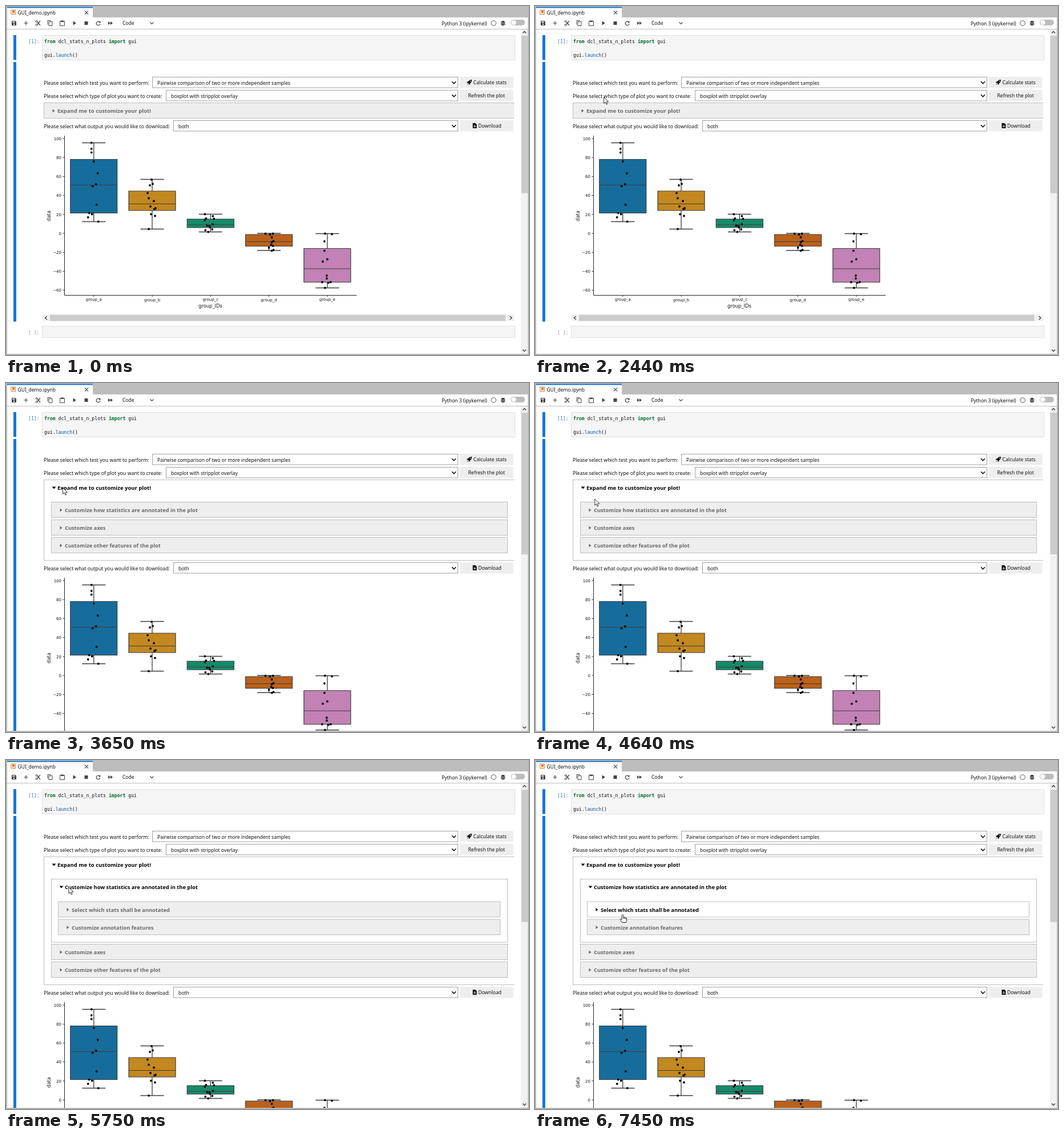
These frames come from a looping animation (916 by 611 pixels, 8 s). An HTML page with a canvas:

```html
<!DOCTYPE html>
<html lang="en">
<head>
<meta charset="utf-8">
<title>Notebook plot GUI</title>
<style>
  html, body { margin: 0; width: 100%; height: 100%; overflow: hidden; background: #fff; }
  canvas { display: block; }
</style>
</head>
<body>
<canvas id="stage" width="916" height="611"></canvas>
<script>
const ctx = document.getElementById('stage').getContext('2d');
const LOOP = 8000;
const UI = '"Noto Sans", sans-serif', MONO = '"DejaVu Sans Mono", monospace', PLOT = '"DejaVu Sans", sans-serif';
const BLUE = '#1976d2', LINE = '#3d3d3d';

// Pointer moves: start, end, number of steps, target x, target y
const MOVES = [
  [820, 1210, 5, 25, 4], [1510, 1510, 1, 45, 11], [1610, 1810, 3, 181, 91.5],
  [2120, 2650, 6, 99.5, 183.5], [4350, 4840, 6, 110, 223],
  [6340, 6770, 5, 125.5, 266], [7160, 7450, 4, 153.5, 270]
];

// Five box levels (top whisker to bottom whisker) and points as x offset, y
const GROUPS = [
  { name: 'a', fill: '#166d9c', box: [239.5, 268.5, 313.5, 362.5, 377.5],
    dots: [-4, 239.5, -4, 250, -4, 256.5, 0, 272, 7, 293, 4, 312, -2, 315.5, 5, 348, -8, 362.5, -3, 364.5, -10, 370, 8, 377.5] },
  { name: 'b', fill: '#c38820', box: [303.5, 324, 346.5, 358, 390.5],
    dots: [-1, 304, 1, 311.5, -4, 314, -8, 327.5, -6, 336.5, 3, 341.5, -3, 351, 6, 354, 4, 355.5, -2, 364.5, 5, 367.5, -6, 390.5] },
  { name: 'c', fill: '#158b6a', box: [364.5, 373, 383, 388, 395.5],
    dots: [-10, 364.5, 4, 368, -8, 372, 6, 372.5, -10, 375, 4, 382, -6, 384.5, -2, 385, -1, 387.5, 3, 391, -9, 392.5, -4, 395.5] },
  { name: 'd', fill: '#ba611b', box: [398, 400, 412.5, 420.5, 428],
    dots: [-6, 398.5, 7, 398.5, 2, 400, 5, 405, 8, 411.5, 5, 413.5, 4, 418, 7, 420, 0, 423, 8, 427, 5, 428.5] },
  { name: 'e', fill: '#c282b5', box: [398.5, 424.5, 460, 483.5, 493.5],
    dots: [-4, 398.5, 8, 399.5, -5, 412, -5, 428.5, 0, 443.5, -8, 447.5, -1, 472, -1, 477, -9, 483.5, 6, 483.5, 2, 484.5, -4, 493.5] }
];

let pointer, cursor, busy;

function rect(x, y, w, h, fill, stroke) {
  if (fill) { ctx.fillStyle = fill; ctx.fillRect(x, y, w, h); }
  if (stroke) { ctx.strokeStyle = stroke; ctx.lineWidth = 1; ctx.strokeRect(x, y, w, h); }
}

function text(str, x, y, size = 8.6, color = '#111', family = UI, weight = 400, align = 'left') {
  ctx.font = `${weight} ${size}px ${family}`;
  ctx.fillStyle = color;
  ctx.textAlign = align;
  ctx.fillText(str, x, y);
}

function shape(d, x, y, fill, stroke, width = 1) {
  const path = new Path2D(d);
  ctx.save();
  ctx.translate(x, y);
  if (fill) { ctx.fillStyle = fill; ctx.fill(path); }
  if (stroke) { ctx.strokeStyle = stroke; ctx.lineWidth = width; ctx.stroke(path); }
  ctx.restore();
}

function dot(x, y, r, fill, stroke) {
  ctx.beginPath();
  ctx.arc(x, y, r, 0, 7);
  if (fill) { ctx.fillStyle = fill; ctx.fill(); }
  if (stroke) { ctx.strokeStyle = stroke; ctx.lineWidth = 1; ctx.stroke(); }
}

const inside = (x, y, w, h) => pointer && pointer.x >= x && pointer.x <= x + w && pointer.y >= y && pointer.y <= y + h;

function pointerAt(t) {
  if (t < MOVES[0][0]) return null;
  let x = 3, y = -8;
  for (const [from, to, steps, tx, ty] of MOVES) {
    if (t < from) break;
    const k = Math.min(steps, 1 + Math.floor((t - from) / (to - from || 1) * (steps - 1) + 1e-6));
    const u = k / steps, e = u * u * (3 - 2 * u);
    x += (tx - x) * e;
    y += (ty - y) * e;
  }
  return { x, y };
}

// Accordion section; h is the full height, 27 when closed
function section(label, x, y, w, h = 27, size = 9.25) {
  const open = h > 27, hover = !open && inside(x, y, w, 27);
  if (hover && !busy) cursor = 'hand';
  const ink = open || hover ? '#000' : '#696969';
  rect(x, y, w, h, open || hover ? '#fff' : '#eee', '#bdbdbd');
  shape(open ? 'M-1 -2H6L2.5 2Z' : 'M0 -3L4 0L0 3Z', x + 15, y + 14, ink);
  text(label, x + 23.5, y + 17.6, size, ink, UI, 700);
}

function select(label, x, y, value) {
  text(label, 66, y + 13.2, 8.7);
  rect(x, y, 791.5 - x, 18.5, '#fff', '#a0a0a0');
  text(value, x + 8.5, y + 13.2, 8.5);
  shape('M-3.5 -1.8L0 1.8L3.5 -1.8', 784.5, y + 9.5, null, '#111', 1.6);
}

function button(label, x, y) {
  rect(795, y, 93.5, 19.5, '#eee');
  text(label, x, y + 13);
}

function tabAndToolbar() {
  rect(0, 0, 916, 20, '#bdbdbd');
  rect(2, 2, 150, 18, '#fff');
  rect(2, 1.5, 150, 2, BLUE);
  rect(9, 7, 7.5, 7.5, '#fff', '#e0762b');
  shape('M0 0H4V5L2 3.5L0 5Z', 11, 8, '#e0762b');
  text('GUI_demo.ipynb', 20.5, 14.8, 8.5);
  shape('M-3 -3L3 3M3 -3L-3 3', 141, 11.5, null, '#555', 1.1);

  rect(2, 20, 912, 20, '#fff');
  rect(2, 40, 912, 1, '#bdbdbd');
  const ink = '#444';
  shape('M-4 -4H2.5L4 -2.5V4H-4Z', 14, 30, ink);
  rect(11.5, 27, 4, 2, '#fff');
  dot(14, 31.8, 1.2, '#fff');
  shape('M-3.5 0H3.5M0 -3.5V3.5', 35, 30, null, ink, 1.2);
  shape('M-3 -4L3.5 4M3.5 -4L-3 4', 56.5, 30, null, ink, 1.2);
  dot(53.5, 27, 1.5, '#fff', ink);
  dot(53.5, 33, 1.5, '#fff', ink);
  shape('M-4 2.5V-4.5H2M-2 -2.5H4V4.5H-2Z', 77, 30, null, ink);
  shape('M-4 -3.5H4V4.5H-4Z', 98.5, 30, null, ink);
  rect(96, 25.5, 5, 2.5, ink);
  shape('M-2.5 -3.5L3 0L-2.5 3.5Z', 120, 30, ink);
  rect(137.5, 27, 6, 6, ink);
  shape('M2.7 -2A3.4 3.4 0 1 0 3.4 1', 161.5, 30.3, null, ink, 1.2);
  shape('M4 -4V-.5H.5Z', 161.5, 30, ink);
  shape('M-4 -3L0 0L-4 3ZM0 -3L4 0L0 3Z', 183, 30, ink);
  text('Code', 204, 33.3, 8.5);
  shape('M-3 -1.5L0 1.5L3 -1.5', 255.5, 30, null, ink, 1.2);
  text('Python 3 (ipykernel)', 763, 33.5, 8.55);
  dot(854, 30, 4.3, null, '#555');
  shape('M-4 -2H4M-4 .3H4M-4 2.6H4M-2 -4L2 4M2 -4L-2 4', 870.5, 30, null, ink, .9);
  shape('M-1.5 -4H1.5L2.6 -2V2.5L1 4.2H-1L-2.6 2.5V-2Z', 870.5, 30, ink);
  rect(869.5, 29, 2, .8, '#fff');
  rect(869.5, 31, 2, .8, '#fff');
  shape('M5 0H20A5 5 0 0 1 20 10H5A5 5 0 0 1 5 0Z', 884, 24, '#bdbdbd');
  dot(889.3, 29, 4.2, '#fff');
}

function codeCell() {
  rect(13, 51, 5, 43.5, BLUE);
  rect(63.5, 51.5, 828, 43, '#f5f5f5', '#e0e0e0');
  const mono = (str, col, y, color = '#111', weight = 400) => text(str, 67 + col * 4.91, y, 8.155, color, MONO, weight);
  text('[1]:', 39, 64.5, 8.155, '#307fc1', MONO);
  mono('from', 0, 64.5, '#006b2d', 700);
  mono('dcl_stats_n_plots', 5, 64.5);
  mono('import', 23, 64.5, '#006b2d', 700);
  mono('gui', 30, 64.5);
  mono('gui.', 0, 88.5);
  mono('launch', 4, 88.5, '#0055aa');
  mono('()', 10, 88.5);
  if (inside(63, 51, 828, 43)) cursor = 'beam';
}

function plot() {
  shape('M102.5 227V506.5H614', 0, 0, null, '#222', 1);
  for (let v = 100; v >= -60; v -= 20) {
    const y = 398 - v * 1.66;
    rect(99.5, y - .4, 3, .9, '#222');
    text(String(v).replace('-', '−'), 97, y + 2.7, 7, '#111', PLOT, 400, 'right');
  }
  GROUPS.forEach(({ name, fill, box, dots }, i) => {
    const x = 153.75 + i * 102.25, [top, q3, mid, q1, low] = box;
    rect(x - .4, 506.5, .9, 3, '#222');
    text('group_' + name, x, 516 + i % 2, 7, '#111', PLOT, 400, 'center');
    shape(`M-20.5 ${top}H20.5M0 ${top}V${q3}M0 ${q1}V${low}M-20.5 ${low}H20.5`, x, 0, null, LINE, 1.3);
    shape(`M-41 ${q3}H41V${q1}H-41ZM-41 ${mid}H41`, x, 0, fill, LINE, 1.2);
    for (let j = 0; j < dots.length; j += 2) dot(x + dots[j], dots[j + 1], 1.9, '#000');
  });
  text('group_IDs', 358, 528.3, 8.4, '#111', PLOT, 400, 'center');
  ctx.save();
  ctx.translate(77.5, 367.5);
  ctx.rotate(-Math.PI / 2);
  text('data', 0, 0, 8.4, '#111', PLOT, 400, 'center');
  ctx.restore();
}

function output(stage) {
  const shift = [0, 114, 197][stage];
  rect(13, 98, 5, 454.5 + shift, BLUE);
  select('Please select which test you want to perform:', 256.5, 124.5, 'Pairwise comparison of two or more independent samples');
  select('Please select which type of plot you want to create:', 280.5, 147.5, 'boxplot with stripplot overlay');
  button('Calculate stats', 818.5, 124);
  shape('M9 0C6 0 4 1 2.8 3L.8 3.4L0 5.5L2 5.4L3.8 7.2L3.5 9L5.6 8.2L6 6.2C8 5 9 3 9 0ZM1.8 6.5L.3 9L2.6 7.5Z', 807, 129, '#111');
  dot(813.5, 131.6, .8, '#eee');
  button('Refresh the plot', 809.5, 146.7);

  ctx.save();
  ctx.beginPath();
  ctx.rect(0, 41, 890, 570);
  ctx.clip();
  section('Expand me to customize your plot!', 66.5, 169.5, 860, [27, 141, 224][stage], 9.5);
  ctx.restore();
  if (stage) {
    const y = stage === 2 ? 322.5 : 239.5;
    section('Customize how statistics are annotated in the plot', 79.5, 208.5, 799, stage === 2 ? 110.5 : 27);
    if (stage === 2) {
      section('Select which stats shall be annotated', 91.5, 248, 774);
      section('Customize annotation features', 91.5, 279, 774);
    }
    section('Customize axes', 79.5, y, 799);
    section('Customize other features of the plot', 79.5, y + 31, 799);
  }

  ctx.save();
  ctx.translate(0, shift);
  select('Please select what output you would like to download:', 293.5, 200.5, 'both');
  button('Download', 827, 200);
  shape('M0 0H4.5L7 2.5V9H0Z', 817.5, 205, '#111');
  shape('M3.5 3V7M1.7 5.3L3.5 7.2L5.3 5.3', 817.5, 205, null, '#eee', 1);
  plot();
  rect(64, 540, 826, 12, '#f1f1f1');
  rect(77, 540.5, 797.5, 11, '#cbcbcb');
  shape('M1.8 -3L-1.5 0L1.8 3M812.5 -3L815.8 0L812.5 3', 70, 546, null, '#444', 1.5);
  text('[ ]:', 39, 574.5, 8.155, '#9a9a9a', MONO);
  rect(63.5, 560.5, 828, 20, '#f5f5f5', '#e0e0e0');
  ctx.restore();
}

function frameAndScrollbar(stage) {
  rect(902, 41, 12, 568, '#f1f1f1');
  rect(902.5, 52, 11.5, [275.5, 248, 231.5][stage], '#cbcbcb');
  shape('M-3 1.5L0 -1.5L3 1.5M-3 555.5L0 558.5L3 555.5', 908, 46, null, '#444', 1.5);
  rect(0, 0, 2, 611, '#b8b8b8');
  rect(914, 0, 2, 611, '#b8b8b8');
  rect(0, 609, 916, 2, '#b8b8b8');
}

function drawPointer() {
  const { x, y } = pointer;
  if (cursor === 'beam') {
    shape('M-3 -5.3H-1L0 -4.5L1 -5.3H3M0 -4.5V4.5M-3 5.3H-1L0 4.5L1 5.3H3', x, y, null, '#111', 1);
  } else if (cursor === 'hand') {
    shape('M-1.3 1.5Q0 -.4 1.3 1.5V5.5Q2.5 4.6 3.5 5.9Q4.8 5.2 5.5 6.5Q7 6.2 7.1 8V11L5.8 14.5H-.8L-4.5 9.5Q-4.6 7.6 -2.8 8.3L-1.3 9.6ZM1.3 5.5V8M3.5 5.9V8.2M5.5 6.5V8.5', x, y, '#fff', '#111', .9);
  } else {
    shape('M0 0V11L2.6 8.6L4.4 12.7L6.2 11.9L4.5 8H8Z', x, y, '#fff', '#222', .9);
  }
}

function draw(t) {
  const stage = t < 3650 ? 0 : t < 5750 ? 1 : 2;
  pointer = pointerAt(t);
  cursor = 'arrow';
  busy = t >= 5660 && t < 5750;
  rect(0, 0, 916, 611, '#fff');
  codeCell();
  output(stage);
  tabAndToolbar();
  frameAndScrollbar(stage);
  const click = '#f0e000cc';
  if (t >= 3450 && t < 3650) dot(99.5, 182.5, 8.4, click);
  if (t >= 5450 && t < 5750) dot(109.5, 222.5, 8.4, click);
  if (pointer) drawPointer();
}

const start = performance.now();
function tick() {
  draw((performance.now() - start) % LOOP);
  requestAnimationFrame(tick);
}
tick();
</script>
</body>
</html>
```
